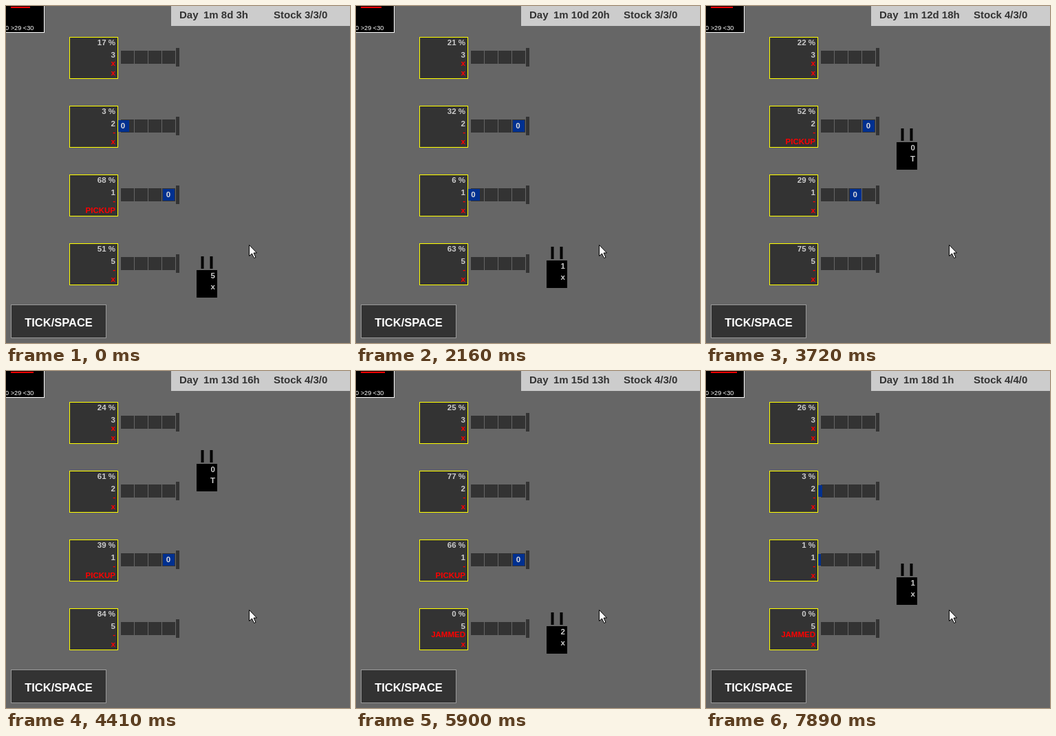
Animation, 500 px wide and 490 px high, one loop 8 s. Source, as an HTML page with a canvas:

```html
<!DOCTYPE html>
<html lang="en">
<head>
<meta charset="utf-8">
<title>Factory tick simulation</title>
<style>
  html, body { margin: 0; width: 100%; height: 100%; overflow: hidden; background: #666; }
  canvas { display: block; }
</style>
</head>
<body>
<canvas id="stage" width="500" height="490"></canvas>
<script>
const ctx = document.getElementById('stage').getContext('2d');
const LOOP = 8000, STEPS = 68;
const DOCK = 384, FORKLIFT_SPEED = 5.2;  // pixels, pixels per hour
const BELT_START = 154, BELT_END = 236;  // parcels move one pixel per hour

// Counters are known at these steps and run evenly in between.
const keySteps = [0, 10, 26, 37, 44, 56, 67];
const clock = [0, 37, 94, 133, 158, 199, 238];

// Progress counts on past 100 for each further product; parcels have the hours they enter and leave the belt.
const stations = [
  { id: 3, idle: true, progress: [17, 20, 22, 24, 25, 25, 26], parcels: [] },
  { id: 2, progress: [3, 20, 45, 61, 71, 84, 103],
    parcels: [{ enter: -16, leave: 132 }, { enter: 232 }] },
  { id: 1, progress: [68, 91, 121, 139, 153, 179, 201],
    parcels: [{ enter: -99, leave: 39 }, { enter: 49, leave: 224 }, { enter: 234.5 }] },
  { id: 5, jams: true, progress: [51, 58, 69, 84, 95, 113, 130], parcels: [] }
];

// The forklift leaves the dock, waits at the top and returns with its load.
const trips = [
  { depart: 3, top: 237, back: 40, load: 1 },
  { depart: 75.9, top: 135, back: 133.05, load: 2 },
  { depart: 188.6, top: 235, back: 225.5, load: 1 }
];

function counter(values, step) {
  let i = 0;
  while (i < keySteps.length - 2 && keySteps[i + 1] <= step) i++;
  const part = (step - keySteps[i]) / (keySteps[i + 1] - keySteps[i]);
  return values[i] + (values[i + 1] - values[i]) * part;
}

function rect(x, y, w, h, fill, border) {
  if (border) {
    ctx.fillStyle = border;
    ctx.fillRect(x, y, w, h);
    x++; y++; w -= 2; h -= 2;
  }
  ctx.fillStyle = fill;
  ctx.fillRect(x, y, w, h);
}

function text(str, x, y, { size = 11.5, color = '#ccc', align = 'right', weight = 'bold' } = {}) {
  ctx.font = `${weight} ${size}px "Liberation Sans", Arial, sans-serif`;
  ctx.textAlign = align;
  ctx.fillStyle = color;
  ctx.fillText(str, x, y);
}

function drawStation({ id, idle, jams, progress, parcels }, y, step, hour) {
  for (let i = 0; i < 4; i++) rect(167 + i * 20, y + 20, 19, 19, '#333');
  rect(247, y + 16, 5, 27, '#333');

  let waiting = false;
  for (const { enter, leave = Infinity } of parcels) {
    if (hour < enter || hour >= leave) continue;
    const x = Math.min(BELT_END, BELT_START + hour - enter);
    waiting = x === BELT_END;
    rect(Math.round(x) - 8, y + 21, 17, 17, '#003090');
    text('0', x, y + 33, { align: 'center', color: '#ddd' });
  }

  const made = Math.floor(counter(progress, step));
  const jammed = jams && made >= 100;
  const red = { color: '#f00' };
  rect(92, y, 71, 61, '#333', '#ff0');
  text(`${jammed ? 0 : made % 100} %`, 159, y + 12);
  text(id, 159, y + 30);
  text(idle ? 'x' : jammed ? 'JAMMED' : '-', 159, y + 42, red);
  text(waiting ? 'PICKUP' : 'x', 159, y + 56, red);
}

function drawForklift(hour) {
  let y = DOCK, load = 5;
  for (const trip of trips.filter(trip => hour >= trip.depart)) {
    const returning = hour >= trip.back;
    load = returning ? trip.load : 0;
    y = returning
      ? Math.min(DOCK, trip.top + FORKLIFT_SPEED * (hour - trip.back))
      : Math.max(trip.top, DOCK - FORKLIFT_SPEED * (hour - trip.depart));
  }
  y = Math.round(y);
  rect(277, y, 30, 40, '#000');
  rect(283.5, y - 20, 4, 18, '#000');
  rect(296.5, y - 20, 4, 18, '#000');
  text(load, 304, y + 12);
  text(load ? 'x' : 'T', 304, y + 28);
}

function drawChart(hour) {
  rect(-1, -1, 57, 40, '#000', '#fff');
  rect(7, 1, 28 + Math.floor((hour + 3) / 24), 2, '#f00');
  text('0 >29 <30', -1, 35, { size: 9.2, color: '#fff', align: 'left', weight: 'normal' });
}

function drawHeader(hour) {
  rect(240, 0, 260, 29, '#ccc');
  const total = 8 * 24 + 3 + Math.floor(hour);
  const [first, second] = trips.slice(1).map(trip => hour < trip.depart ? 3 : 4);
  const style = { size: 15, color: '#333', align: 'left' };
  text('Day', 252, 18, style);
  text(`1m ${Math.floor(total / 24)}d ${total % 24}h`, 287, 18, style);
  text(`Stock ${first}/${second}/0`, 389, 18, style);
}

function drawCursor() {
  const arrow = new Path2D('M353.5 347.5V363.5L357.5 360L360.5 366.5L363 365.5L360 359H364.5Z');
  ctx.fillStyle = '#fff';
  ctx.fill(arrow);
  ctx.strokeStyle = '#000';
  ctx.stroke(arrow);
}

function draw(now) {
  const step = Math.floor(now % LOOP / LOOP * STEPS);
  const hour = counter(clock, step);
  rect(0, 0, 500, 490, '#666');
  drawChart(hour);
  drawHeader(hour);
  stations.forEach((station, i) => drawStation(station, 45 + 100 * i, step, hour));
  drawForklift(hour);
  rect(7, 434, 139, 49, '#333', '#999');
  text('TICK/SPACE', 76.5, 466, { size: 16.5, color: '#fff', align: 'center' });
  drawCursor();
}

const start = performance.now();
function loop() {
  draw(performance.now() - start);
  requestAnimationFrame(loop);
}
loop();
</script>
</body>
</html>
```
